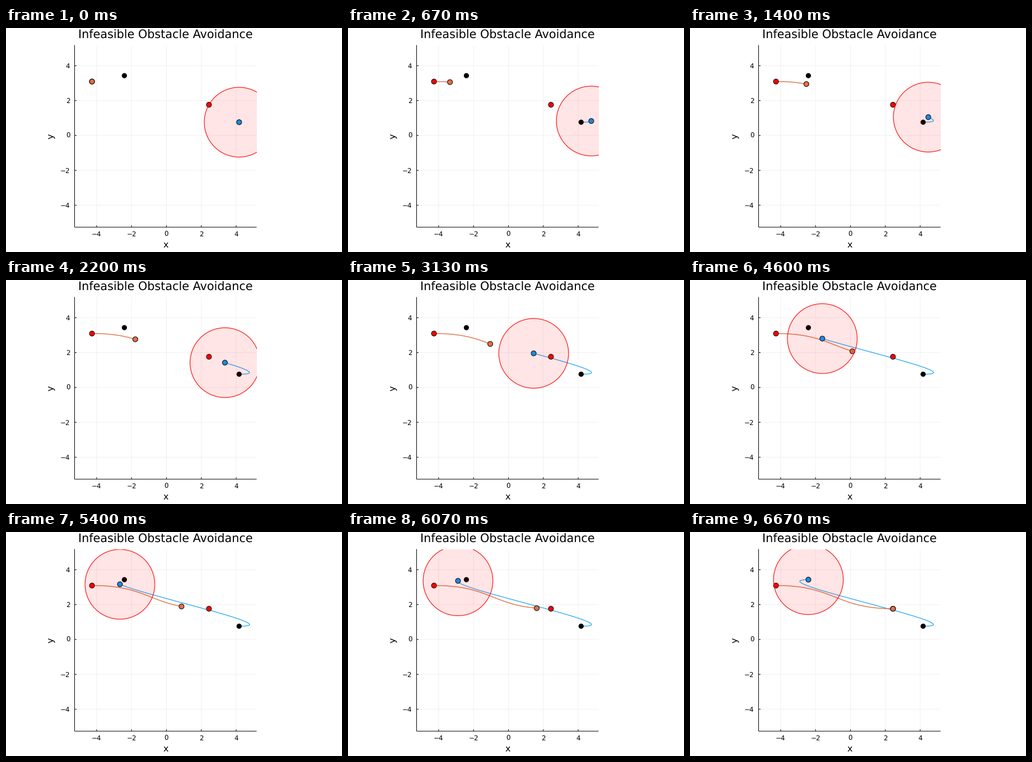
A matplotlib script that plays this animation: 600x400 px, repeating every 6.74 s.

```python
import numpy as np
import matplotlib.pyplot as plt
from matplotlib.animation import FuncAnimation
from matplotlib.patches import Circle

W, H, DPI = 600, 400, 100
PX = 72 / DPI                      # one pixel in points
STEPS, FPS = 100, 15
LOOP, TICK = 6740, 20              # milliseconds
LEFT, RIGHT, TOP, BOTTOM = 122.5, 447.5, 30.5, 355.7
X0, Y0, UNIT = 286.45, 191.9, 31.14   # plot centre and scale in pixels
BLUE, ORANGE = "#009AFA", "#E26F46"

plt.rcParams["font.family"] = "DejaVu Sans"
plt.rcParams["text.hinting"] = "none"


def min_effort(start, goal, v0, v1):
    """Least-effort path of a double integrator between two states."""
    dt = 1 / STEPS
    reach = np.array([(STEPS - 1 - np.arange(STEPS)) * dt**2,
                      np.full(STEPS, dt)])
    acc = np.linalg.pinv(reach) @ np.array([goal - start - v0, v1 - v0])
    vel = v0 + dt * np.concatenate([[0], np.cumsum(acc)[:-1]])
    return start + dt * np.concatenate([[0], np.cumsum(vel)])


def plan(start, goal, speed=10):
    return np.column_stack([min_effort(start[0], goal[0], speed, speed),
                            min_effort(start[1], goal[1], 0, 0)])


walker = plan((-4.268, 3.092), (2.44, 1.762))
hazard = plan((4.17, 0.761), (-2.41, 3.43))

fig = plt.figure(figsize=(W / DPI, H / DPI), dpi=DPI, facecolor="white")
ax = fig.add_axes([LEFT / W, 1 - BOTTOM / H,
                   (RIGHT - LEFT) / W, (BOTTOM - TOP) / H])
xmin, xmax = (LEFT - X0) / UNIT, (RIGHT - X0) / UNIT
ymin, ymax = (Y0 - BOTTOM) / UNIT, (Y0 - TOP) / UNIT
ax.set_xlim(xmin, xmax)
ax.set_ylim(ymin, ymax)
ax.axis("off")


def label(x, y, text, size, angle=0, ha="center"):
    fig.text(x / W, 1 - y / H, text, fontsize=size * PX, rotation=angle,
             rotation_mode="anchor", ha=ha, va="baseline")


def rule(xs, ys, z=2.5, **style):
    ax.plot(xs, ys, color="black", lw=PX, snap=False, clip_on=False,
            solid_capstyle="butt", zorder=z, **style)


rule([xmin, xmin], [ymin, ymax])
rule([xmin, xmax], [ymin, ymin])
notch = 3.5 / UNIT
for v in range(-4, 5, 2):
    rule([v, v], [ymin, ymax], 1, alpha=0.06)
    rule([xmin, xmax], [v, v], 1, alpha=0.06)
    rule([v, v], [ymin, ymin + notch])
    rule([xmin, xmin + notch], [v, v])
    text = str(v).replace("-", "\u2212")
    label(X0 + v * UNIT, 371.9, text, 11.9)
    label(114.4, Y0 - v * UNIT + 4.4, text, 11.9, ha="right")

label(284.7, 18.3, "Infeasible Obstacle Avoidance", 20.8)
label(284.8, 392, "x", 16)
label(85.6, 193, "y", 16, 90)


def dot(pos, color, z, radius=4.5, edge=1):
    return ax.add_patch(Circle(pos, radius / UNIT, fc=color, ec="black",
                               lw=edge * PX, zorder=z))


def trail(color, width, z):
    return ax.plot([], [], color=color, lw=width * PX, zorder=z)[0]


hazard_trail = trail(BLUE, 1.1, 2.6)
walker_trail = trail(ORANGE, 1.4, 2.7)
for path, color, radius, edge in ((walker, "red", 4.5, 1),
                                  (hazard, "black", 4.6, 0)):
    dot(path[0], color, 3, radius, edge)
    dot(path[-1], color, 3, radius, edge)
walker_dot = dot(walker[0], ORANGE, 4)
hazard_dot = dot(hazard[0], BLUE, 4)
zone = ax.add_patch(Circle(hazard[0], 2, fc=(1, 0, 0, 0.1), ec="red",
                           lw=1.1 * PX, zorder=5))


def draw(i):
    # step shown at the middle of this tick, with starts rounded to 10 ms
    now = (i + 0.5) * TICK + 5
    k = min(int(now * FPS / 1000), STEPS)
    walker_trail.set_data(*walker[:k + 1].T)
    hazard_trail.set_data(*hazard[:k + 1].T)
    walker_dot.center = walker[k]
    hazard_dot.center = zone.center = hazard[k]
    return walker_trail, hazard_trail, walker_dot, hazard_dot, zone


anim = FuncAnimation(fig, draw, frames=LOOP // TICK, interval=TICK,
                     repeat=True, cache_frame_data=False)
plt.show()
```
